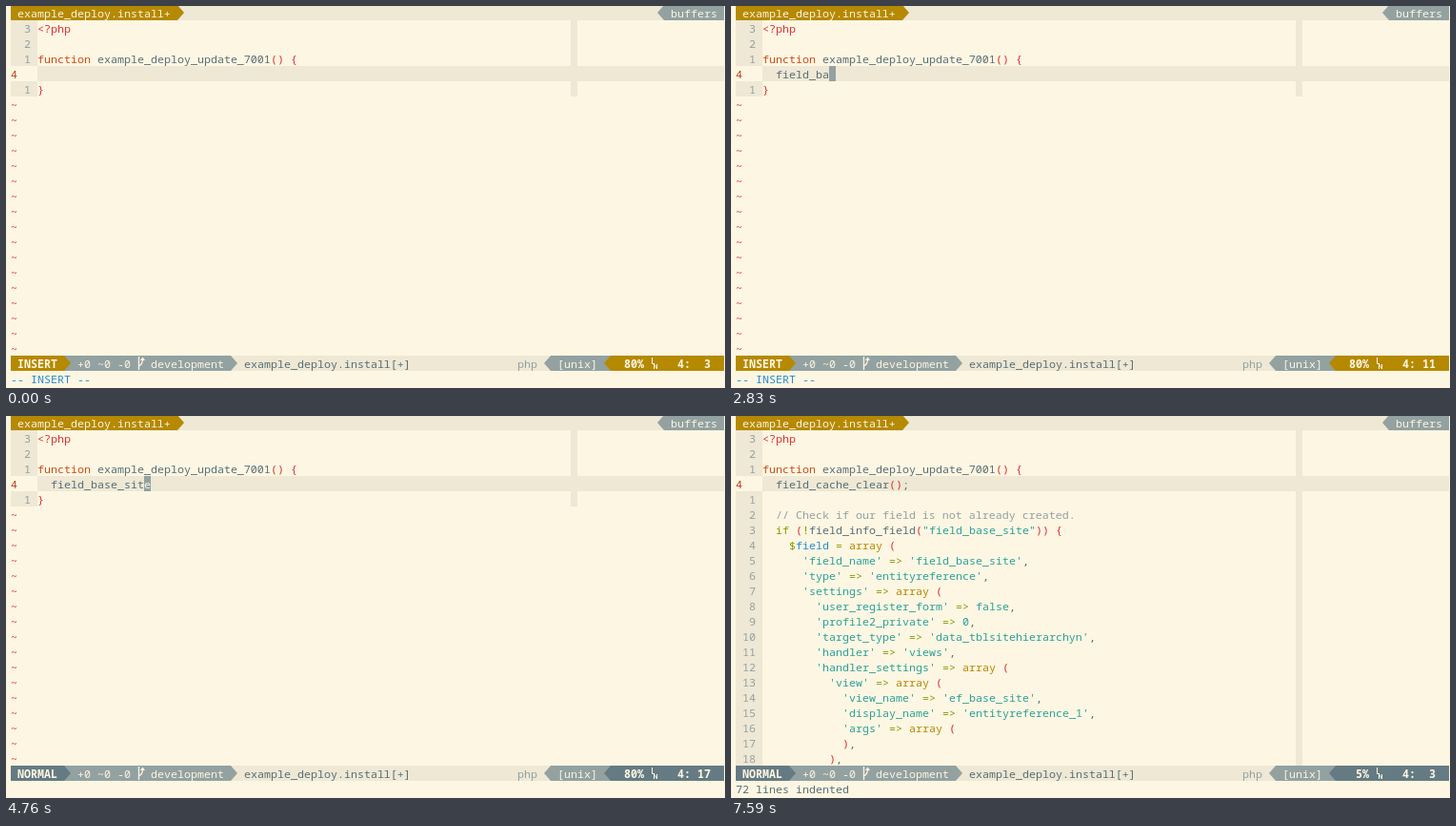
These frames come from a looping animation (755x401 px, 8 s). An HTML page with a canvas:

```html
<!DOCTYPE html>
<html lang="en">
<head>
<meta charset="utf-8">
<title>Editor session</title>
<style>
html, body { margin: 0; width: 100%; height: 100%; overflow: hidden; background: #fdf6e3; }
canvas { display: block; width: 755px; height: 401px; }
</style>
</head>
<body>
<canvas id="stage"></canvas>
<script>
const W = 755, H = 401, LOOP = 8000;
const CW = 7, RH = 16, LEFT = 5, RIGHT = 754, GUTTER = 4;
const C = {
  bg: '#fdf6e3', bar: '#eee8d5', gray: '#93a1a1', slate: '#657b83', text: '#586e75',
  yellow: '#b58900', red: '#dc322f', orange: '#cb4b16', blue: '#268bd2',
  cyan: '#2aa198', green: '#859900', current: '#b5401c'
};

const canvas = document.getElementById('stage');
const ctx = canvas.getContext('2d');
const dpr = window.devicePixelRatio || 1;
canvas.width = Math.round(W * dpr);
canvas.height = Math.round(H * dpr);
ctx.scale(dpr, dpr);

const FONT = '"Noto Sans Mono", "Liberation Mono", monospace';
const colX = c => LEFT + c * CW;
const rowY = r => r * RH - 1;

function rect(x0, y, x1, h, color) {
  ctx.fillStyle = color;
  ctx.fillRect(x0, y, x1 - x0, h);
}

function text(str, col, row, color, bold) {
  ctx.font = (bold ? 'bold ' : '') + '11.667px ' + FONT;
  ctx.fillStyle = color;
  ctx.fillText(str, colX(col), rowY(row) + 13);
}

function cells(row, from, to, color) {
  rect(colX(from), rowY(row), colX(to), RH, color);
}

// Triangular separator one cell wide; dir 1 points right, -1 left.
function arrow(col, row, dir, color) {
  const base = colX(dir > 0 ? col : col + 1), y = rowY(row);
  ctx.fillStyle = color;
  ctx.beginPath();
  ctx.moveTo(base, y);
  ctx.lineTo(base + dir * CW, y + RH / 2);
  ctx.lineTo(base, y + RH);
  ctx.fill();
}

const head = ['<?php', '', 'function example_deploy_update_7001() {'];
const generated = `  field_cache_clear();

  // Check if our field is not already created.
  if (!field_info_field("field_base_site")) {
    $field = array (
      'field_name' => 'field_base_site',
      'type' => 'entityreference',
      'settings' => array (
        'user_register_form' => false,
        'profile2_private' => 0,
        'target_type' => 'data_tblsitehierarchyn',
        'handler' => 'views',
        'handler_settings' => array (
          'view' => array (
            'view_name' => 'ef_base_site',
            'display_name' => 'entityreference_1',
            'args' => array (
            ),
          ),`.split('\n');

const rules = [
  [/^\/\/.*/, C.gray],
  [/^<\?php/, C.red],
  [/^(['"]).*?\1/, C.cyan],
  [/^function\b/, C.orange],
  [/^if\b/, C.green],
  [/^array\b/, C.yellow],
  [/^(false|0)\b/, C.cyan],
  [/^\$/, C.green],
  [/^field(?= =)/, C.blue],
  [/^\w+/, C.text],
  [/^[(){}]+/, C.red],
  [/^[=>!]+/, C.green],
  [/^ +/, null],
  [/^./, C.text]
];

function code(line, row) {
  let col = GUTTER, rest = line;
  while (rest) {
    for (const [re, color] of rules) {
      const m = rest.match(re);
      if (!m) continue;
      if (color) text(m[0], col, row, color);
      col += m[0].length;
      rest = rest.slice(m[0].length);
      break;
    }
  }
}

// [time, number of characters typed]
const WORD = 'field_base_site';
const keys = [
  [1500, 1], [1650, 2], [1790, 3], [1940, 4], [2090, 5], [2390, 6],
  [2680, 7], [2830, 8], [2980, 9], [3130, 10], [3420, 11], [3570, 12],
  [3870, 14], [4020, 15]
];

function stateAt(t) {
  let typed = 0;
  for (const [at, n] of keys) if (t >= at) typed = n;
  const s = {
    normal: t >= 4610, pct: '80%', col: typed + 3, cursor: null,
    msg: '-- INSERT --', msgColor: C.blue,
    lines: head.concat('  ' + WORD.slice(0, typed), '}'), columnRows: 5
  };
  if (t < 4610) {
    if (t >= 1500 || (t >= 450 && t < 900)) s.cursor = typed + 2;
    return s;
  }
  s.col = 17;
  s.msg = '';
  s.msgColor = C.text;
  if (t < 5660) {
    s.cursor = 16;
  } else if (t < 6550) {
    s.msg = ':call DrupalExportField()';
  } else {
    const full = t >= 6700;
    s.msg = '72 lines indented';
    s.lines = head.concat(full ? generated : generated.slice(0, 11).concat(''));
    s.columnRows = full ? 22 : 14;
    if (full) {
      s.pct = ' 5%';
      s.col = 3;
      if (t < 7590) s.cursor = 2;
    }
  }
  return s;
}

function drawTabs() {
  rect(LEFT, 0, RIGHT, 15, C.bar);
  cells(0, 0, 25, C.yellow);
  arrow(25, 0, 1, C.yellow);
  text('example_deploy.install+', 1, 0, C.bg);
  arrow(97, 0, -1, C.gray);
  cells(0, 98, 107, C.gray);
  text('buffers', 99, 0, C.bg);
}

function drawBuffer(s) {
  const x = colX(GUTTER + 80);
  rect(x, 15, x + CW, s.columnRows * RH, C.bar);
  for (let row = 1; row <= 22; row++) {
    const line = s.lines[row - 1];
    if (line === undefined) {
      text('~', 0, row, C.red);
      continue;
    }
    if (row === 4) {
      cells(row, GUTTER, 107, C.bar);
      text('4', 0, row, C.current);
    } else {
      cells(row, 0, GUTTER, C.bar);
      text(String(Math.abs(row - 4)).padStart(3), 0, row, C.gray);
    }
    code(line, row);
  }
  if (s.cursor !== null) {
    const col = GUTTER + s.cursor;
    cells(4, col, col + 1, C.gray);
    text(s.lines[3][s.cursor] || '', col, 4, C.bg);
  }
}

function drawBranch(x, y) {
  ctx.strokeStyle = ctx.fillStyle = C.bg;
  ctx.lineWidth = 1.3;
  ctx.beginPath();
  ctx.moveTo(x + 1.5, y + 1);
  ctx.lineTo(x + 1.5, y + 15);
  ctx.moveTo(x + 1.5, y + 11);
  ctx.quadraticCurveTo(x + 5.5, y + 9, x + 5.5, y + 4);
  ctx.stroke();
  ctx.beginPath();
  ctx.moveTo(x + 3, y + 5);
  ctx.lineTo(x + 5.5, y + 1.5);
  ctx.lineTo(x + 8, y + 5);
  ctx.fill();
}

function drawLineMark(x, y) {
  ctx.strokeStyle = C.bg;
  ctx.lineWidth = 1;
  ctx.beginPath();
  ctx.moveTo(x + 1.5, y + 2);
  ctx.lineTo(x + 1.5, y + 8.5);
  ctx.lineTo(x + 4, y + 8.5);
  ctx.moveTo(x + 3.5, y + 14);
  ctx.lineTo(x + 3.5, y + 9);
  ctx.lineTo(x + 6.5, y + 14);
  ctx.lineTo(x + 6.5, y + 9);
  ctx.stroke();
}

function drawStatus(s) {
  const row = 23, y = rowY(row), mode = s.normal ? C.slate : C.yellow;
  cells(row, 0, 107, C.bar);
  cells(row, 8, 33, C.gray);
  arrow(33, row, 1, C.gray);
  cells(row, 0, 8, mode);
  arrow(8, row, 1, mode);
  text(s.normal ? 'NORMAL' : 'INSERT', 1, row, C.bg, true);
  text('+0 ~0 -0', 10, row, C.bg);
  drawBranch(colX(19), y);
  text('development', 21, row, C.bg);
  text('example_deploy.install[+]', 35, row, C.text);

  text('php', 76, row, C.gray);
  arrow(80, row, -1, C.gray);
  cells(row, 81, 90, C.gray);
  text('[unix]', 82, row, C.bg);
  arrow(89, row, -1, mode);
  cells(row, 90, 107, mode);
  text(s.pct, 92, row, C.bg, true);
  drawLineMark(colX(96), y);
  text('4:' + String(s.col).padStart(3), 100, row, C.bg, true);
  text(s.msg, 0, 24, s.msgColor);
}

const start = performance.now();
function draw(now) {
  const s = stateAt(Math.max(0, now - start) % LOOP);
  rect(0, 0, W, H, C.bg);
  drawTabs();
  drawBuffer(s);
  drawStatus(s);
  requestAnimationFrame(draw);
}
draw(start);
</script>
</body>
</html>
```
